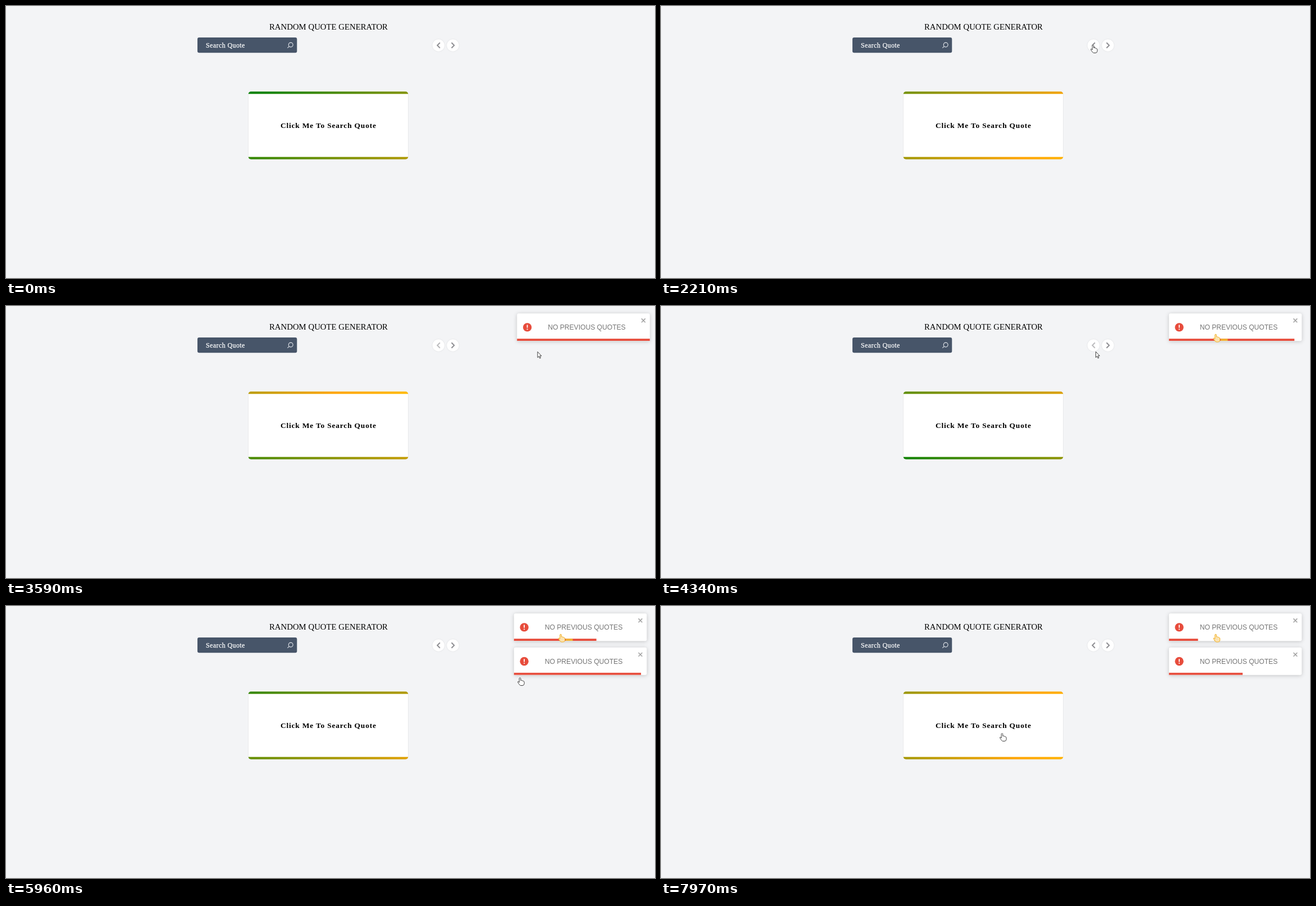
An HTML page that plays this animation: 1156x484 px, repeating every 8000 ms.

```html
<!DOCTYPE html>
<html lang="en">
<head>
<meta charset="utf-8">
<title>Random quote generator</title>
<style>
  html, body { margin: 0; width: 100%; height: 100%; overflow: hidden; background: #f3f4f6; }
  svg { display: block; width: 1156px; height: 484px; }
  text { font-family: "Liberation Serif", "Times New Roman", serif; }
  .message { font: 12.1px "Liberation Sans", Arial, sans-serif; fill: #757575; }
  .box { fill: #fff; filter: drop-shadow(0 1px 3.5px rgba(0, 0, 0, .2)); }
  .round { fill: #fff; filter: drop-shadow(0 0 1px rgba(0, 0, 0, .1)); }
  .chevron { fill: none; stroke: #8f8f93; stroke-width: 2; }
</style>
</head>
<body>
<svg viewBox="0 0 1156 484">
  <defs>
    <linearGradient id="topFill" gradientUnits="userSpaceOnUse" x1="431.5" x2="1571.5" y1="0" y2="0">
      <stop offset="0" stop-color="green"/>
      <stop offset=".5" stop-color="orange"/>
      <stop offset="1" stop-color="yellow"/>
    </linearGradient>
    <linearGradient id="bottomFill" href="#topFill"/>
    <clipPath id="cardShape"><rect x="431.5" y="152.2" width="285" height="120.6" rx="5"/></clipPath>
    <path id="hand" d="M-1.3 1Q0-.9 1.3 1V5Q3 4 4 5.4Q5.6 5 6 6.4Q7.6 6.2 7.6 8V11Q7.2 13.8 4.5 14H1Q-1 13-2 11L-4 8Q-4 6.5-2.6 7L-1.3 8.5Z"/>
    <g id="toastFace">
      <rect class="box" width="236.5" height="49" rx="3"/>
      <circle cx="18.3" cy="24.7" r="7.7" fill="#e74c3c"/>
      <path d="M18.3 20.4v5.2M18.3 27.2v1.8" stroke="#fff" stroke-width="1.8"/>
      <text class="message" x="55" y="28.8">NO PREVIOUS QUOTES</text>
      <path d="M221.7 9.2l6.8 6.8m0-6.8l-6.8 6.8" stroke="#a3a3a3" stroke-width="1.6"/>
    </g>
  </defs>

  <text x="574.5" y="42" font-size="14.8" text-anchor="middle">RANDOM QUOTE GENERATOR</text>

  <rect x="341" y="56" width="177.3" height="27.3" rx="3" fill="#475569"/>
  <text x="356" y="74" font-size="12" letter-spacing=".4" fill="#fff" stroke="#fff" stroke-width=".25">Search Quote</text>
  <g fill="none" stroke="#e3e7ec" stroke-width="1.1">
    <circle cx="507.2" cy="69" r="3.9"/><path d="M504.4 71.8L501.4 74.7"/>
  </g>

  <circle class="round" cx="770.3" cy="70" r="10.7"/>
  <circle class="round" cx="796" cy="70" r="10.7"/>
  <path class="chevron" id="prev" d="M773 65.2L768.3 70L773 74.8"/>
  <path class="chevron" d="M793.6 65.2L798.3 70L793.6 74.8"/>

  <rect x="431.5" y="152.2" width="285" height="120.6" rx="5" fill="#fff" stroke="#e9eaec"/>
  <g clip-path="url(#cardShape)">
    <rect x="431.5" y="152" width="285" height="4.4" fill="url(#topFill)"/>
    <rect x="431.5" y="268.6" width="285" height="4.4" fill="url(#bottomFill)"/>
  </g>
  <text x="489" y="217" font-size="13.5" font-weight="700" letter-spacing=".78">Click Me To Search Quote</text>

  <g class="toast"><use href="#toastFace"/><rect class="bar" y="45" height="3.8" fill="#e74c3c"/></g>
  <g class="toast"><use href="#toastFace"/><rect class="bar" y="45" height="3.8" fill="#e74c3c"/></g>

  <g id="mark">
    <rect id="markBar" x="997" y="58.2" height="3.8" fill="#f2b233"/>
    <path d="M985 61Q990 67 995 61Z" fill="#f5b62e"/>
    <use href="#hand" x="988" y="50" fill="#fbe3b0" stroke="#f3b229"/>
  </g>

  <g id="cursor" fill="#fff" stroke="#2b2b2b" stroke-width=".9">
    <path id="arrow" d="M.4.3V10.6L2.7 8.4L4.3 12L5.9 11.3L4.3 7.7H7.4Z"/>
    <use id="pointer" href="#hand" x="-.5" y="-.5"/>
  </g>
</svg>
<script>
const LOOP = 8000;
const $ = id => document.getElementById(id);
const clamp = v => Math.min(1, Math.max(0, v));
const show = (el, on) => el.setAttribute("visibility", on ? "visible" : "hidden");
const easeOut = k => 1 - (1 - k) ** 3;
const smooth = k => k * k * (3 - 2 * k);

// Interpolates rows of [time, ...values].
function track(rows, t, ease) {
  const i = rows.findIndex(r => r[0] > t);
  if (i < 0) return rows.at(-1).slice(1);
  if (i === 0) return rows[0].slice(1);
  const a = rows[i - 1], b = rows[i], k = ease((t - a[0]) / (b[0] - a[0]));
  return a.slice(1).map((v, j) => v + (b[j + 1] - v) * k);
}

const path = [
  [310, 1089, 466], [700, 930, 190], [950, 835, 31], [1150, 785, 69], [1280, 749, 76],
  [1600, 830, 110], [1950, 783, 79], [2150, 770, 70], [2900, 770, 70], [3270, 823, 181],
  [3740, 985, 50], [4050, 988, 50], [4340, 774, 81], [4500, 770, 71], [5050, 770, 71],
  [5420, 878.5, 172], [5960, 916, 128], [6300, 930, 145], [7100, 760, 215], [7970, 608, 227]
];
const holds = [[110, 310], [2340, 2620], [2620, 2880]];
const bounce = [[0, 2160], [.6, -18], [.75, 7.2], [.9, -3.6], [1, 0]];
const toasts = [
  { y: 13.2, enter: 3060, run: 4065 },
  { y: 73.8, enter: 5045, run: 5745 }
];
document.querySelectorAll(".toast").forEach((el, i) => toasts[i].el = el);

function slideGradient(id, t) {
  const p = t % 5000 / 5000;
  const u = p < .75 ? p : (1 - p) * 3;
  $(id).setAttribute("gradientTransform", `translate(${-570 * u})`);
}

function drawToast({ el, y, enter, run }, t) {
  const k = clamp((t - enter) / 700);
  const x = 904.8 + track(bounce, k, easeOut)[0];
  const width = 236.5 * (1 - clamp((t - run) / 5000));
  show(el, t >= enter);
  el.setAttribute("transform", `translate(${x} ${y})`);
  el.setAttribute("opacity", easeOut(clamp(k / .6)));
  el.querySelector(".bar").setAttribute("width", width);
  return x + width;
}

function isLink(x, y, t) {
  const button = [770.3, 796].some(cx => Math.hypot(x - cx, y - 70) < 10.7);
  const card = x > 431 && x < 717 && y > 152 && y < 273;
  const toast = toasts.some(o => t > o.enter + 300 && x > 904 && x < 1142 && y > o.y && y < o.y + 57);
  return button || card || toast;
}

function draw(t) {
  const hold = holds.find(([a, b]) => t >= a && t < b);
  if (hold) t = hold[0];

  slideGradient("topFill", t + 50);
  slideGradient("bottomFill", t + 950);
  $("prev").setAttribute("opacity", t > 2900 && t < 5100 ? .6 : 1);

  const [barEnd] = toasts.map(o => drawToast(o, t));
  show($("mark"), t > 4060);
  $("markBar").setAttribute("width", 12.5 * clamp((barEnd - 997) / 12.5));

  const [x, y] = track(path, t, smooth);
  const link = isLink(x, y, t);
  $("cursor").setAttribute("transform", `translate(${x} ${y})`);
  show($("arrow"), t >= 310 && !link);
  show($("pointer"), t >= 310 && link);
}

const start = performance.now();
function tick() {
  draw((performance.now() - start) % LOOP);
  requestAnimationFrame(tick);
}
tick();
</script>
</body>
</html>
```
